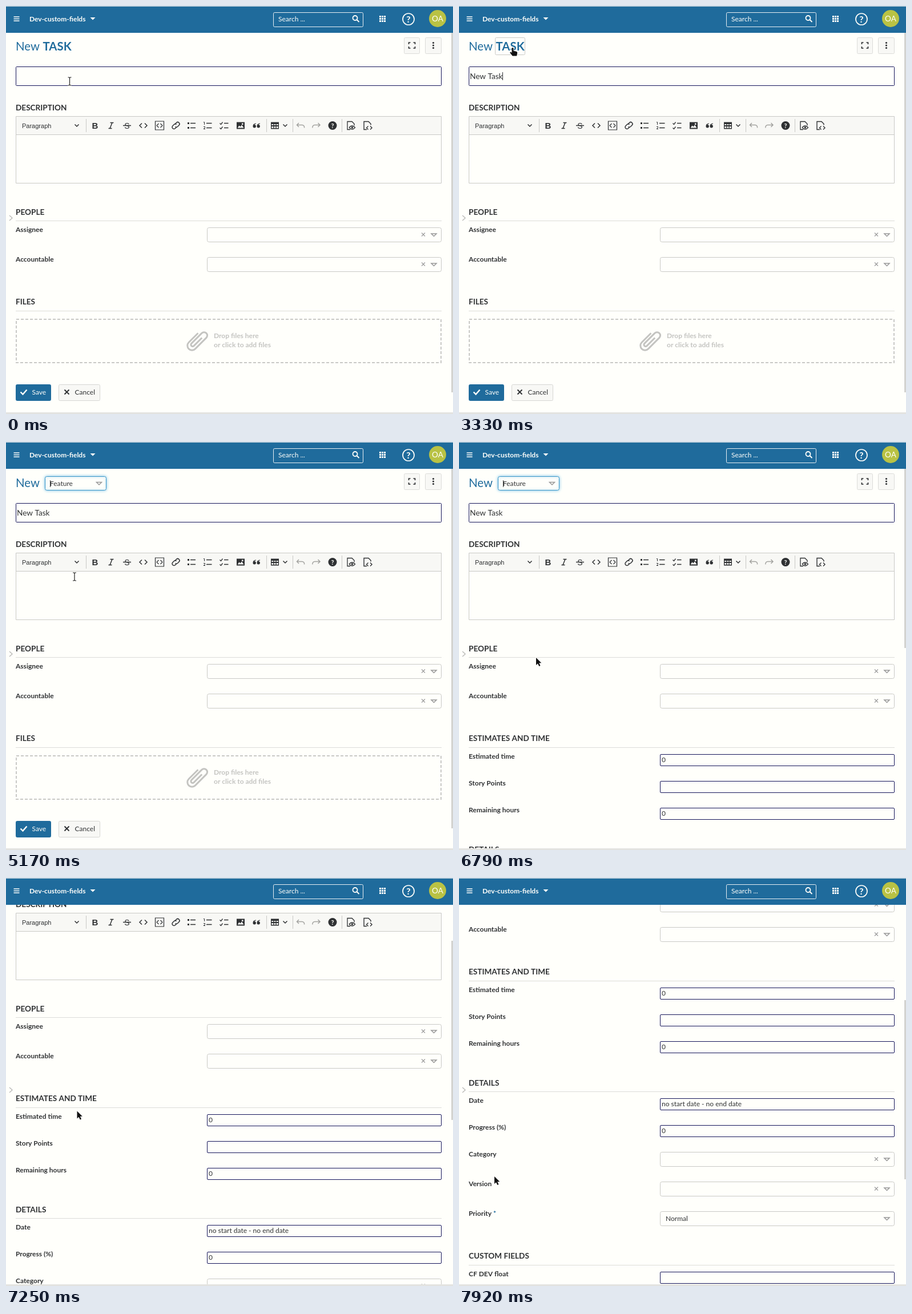
An HTML page with a canvas that plays this animation: 783x715 px, repeating every 8 s.

```html
<!DOCTYPE html>
<html lang="en">
<head>
<meta charset="utf-8">
<title>New task form</title>
<style>
html, body { margin: 0; width: 100%; height: 100%; overflow: hidden; background: #fffffb; }
canvas { display: block; }
</style>
</head>
<body>
<canvas id="stage" width="783" height="715"></canvas>
<script>
const ctx = document.getElementById('stage').getContext('2d');
const LOOP = 8000, FPS = 24;
const PAPER = '#fffffb', BLUE = '#1f6b9c', INK = '#2f3133', NAVY = '#15155a',
      GREY = '#c9c9c6', MUTED = '#999', PANEL = '#f8f8f5';

// Keyframes: [tick, ...values], linear in between
const MOUSE = [[0, 111.5, 132], [2, 111.5, 132], [3, 112.5, 131], [64, 112.5, 131], [75, 94, 73],
  [101, 94, 73], [116, 119, 236], [123, 119, 236], [124, 120, 236], [145, 120, 236], [146, 120, 237],
  [149, 120, 237], [153, 119, 264], [156, 119, 264], [163, 135, 378], [174, 124.5, 408.5],
  [176, 124, 410], [185, 61, 523], [190, 62, 523]];
const SCROLL = [[163, 0], [174, 133], [176, 152], [185, 270], [190, 355]];

function track(keys, tick) {
  if (tick <= keys[0][0]) return keys[0].slice(1);
  const i = keys.findIndex(k => k[0] > tick);
  if (i < 0) return keys.at(-1).slice(1);
  const a = keys[i - 1], b = keys[i], p = (tick - a[0]) / (b[0] - a[0]);
  return a.slice(1).map((v, n) => v + (b[n + 1] - v) * p);
}

function text(s, x, y, { color = INK, size = 12, weight = 400, family = 'Lato', align = 'left' } = {}) {
  ctx.font = `${weight} ${size}px ${family}, sans-serif`;
  ctx.fillStyle = color;
  ctx.textAlign = align;
  ctx.fillText(s, x, y);
}
const bold = (s, x, y, o) => text(s, x, y, { weight: 700, ...o });

function fill(x, y, w, h, color) {
  ctx.fillStyle = color;
  ctx.fillRect(x, y, w, h);
}

// Box whose one-pixel border lies inside x, y, w, h
function box(x, y, w, h, border, back, r = 0) {
  ctx.beginPath();
  ctx.roundRect(x + .5, y + .5, w - 1, h - 1, r);
  if (back) { ctx.fillStyle = back; ctx.fill(); }
  ctx.lineWidth = 1;
  ctx.strokeStyle = border;
  ctx.stroke();
}

function icon(d, x, y, { color = INK, stroke = 1.5, solid, angle = 0 } = {}) {
  ctx.save();
  ctx.translate(x, y);
  ctx.rotate(angle);
  const path = new Path2D(d);
  ctx.fillStyle = ctx.strokeStyle = color;
  ctx.lineWidth = stroke;
  if (solid) ctx.fill(path, 'evenodd'); else ctx.stroke(path);
  ctx.restore();
}

function disc(x, y, r, color) {
  ctx.beginPath();
  ctx.arc(x, y, r, 0, 7);
  ctx.fillStyle = color;
  ctx.fill();
}

const DOWN = 'M-4.5 -2h9l-4.5 4.5z', UP = 'M-4.5 2h9l-4.5 -4.5z';
const CHEVRON = 'M-3.5 -2l3.5 3.5l3.5 -3.5', CROSS = 'M-3 -3l6 6M3 -3l-6 6';
const EDITOR_ICONS = [
  [124, CHEVRON], [489, CHEVRON],
  [184, 'M-1.5 -5h6M-4.5 5h6M2 -5l-4 10'],
  [212, 'M-7 0h14'],
  [240.5, 'M-2.5 -4l-4 4l4 4M2.5 -4l4 4l-4 4'],
  [269, 'M-7.5 -7.5h15v15h-15zM-1.5 -3.5l-3.5 3.5l3.5 3.5M1.5 -3.5l3.5 3.5l-3.5 3.5', { stroke: 1.2 }],
  [297.5, 'M-1 -3l2 -2a3 3 0 0 1 4.5 4.5l-2.5 2.5a3 3 0 0 1 -4 0M1 3l-2 2a3 3 0 0 1 -4.5 -4.5l2.5 -2.5a3 3 0 0 1 4 0'],
  [325, 'M-7 -4h3M-7 4h3', { stroke: 3 }], [325, 'M-2 -4h9M-2 4h9'],
  [353, 'M-7 -6h1.5v4.5M-7 2h2.5v2l-2.5 2h3', { stroke: 1 }], [353, 'M-2 -4h9.5M-2 4h9.5'],
  [382, 'M-7.5 -4l2 2l3 -4M-7.5 4l2 2l3 -4M0 -4h7.5M0 4h7.5', { stroke: 1.3 }],
  [411, 'M-7 -6h14v12h-14zM-5.5 4h11l-3.5 -5l-2.5 3l-2 -2zM2 -4h2.5v2.5h-2.5z', { solid: true }],
  [439, 'M-1 -4q-5.5 .5 -5.5 5a2.7 2.7 0 1 0 2.5 -2.5q.5 -1.5 3 -1.5zM6 -4q-5.500 .5 -5.500 5a2.700 2.700 0 1 0 2.500 -2.500q.5 -1.500 3 -1.500z', { solid: true }],
  [471, 'M-7 -6h14v12h-14zM-5.7 -2.5v2h3v-2zM-1.300 -2.500v2h2.600v-2zM2.700 -2.500v2h3v-2zM-5.700 1.500v3h3v-3zM-1.300 1.500v3h2.600v-3zM2.700 1.500v3h3v-3z', { solid: true }],
  [516, 'M-3 -4.500l-3.500 3.500l3.500 3.500M-6.500 -1h9a4 4 0 0 1 4 5', { color: '#a3a3a0' }],
  [543.5, 'M3 -4.500l3.500 3.500l-3.500 3.500M6.500 -1h-9a4 4 0 0 0 -4 5', { color: '#a3a3a0' }],
  [604, 'M-1 7h-5v-14h8l4 4v3M-3 3.500q5 -6 10.500 0q-5 6 -10.500 0', { stroke: 1.3 }],
  [604, 'M.5 3.500a1.800 1.800 0 1 0 3.600 0a1.800 1.800 0 1 0 -3.600 0', { solid: true }],
  [633, 'M-1 7h-5v-14h8l4 4v2M1.500 1l-3 3l3 3M5 1l3 3l-3 3', { stroke: 1.4 }]
];

function editor() {
  box(17, 193, 746, 118, GREY);
  fill(18, 194, 744, 31, PANEL);
  fill(17, 225, 746, 1, GREY);
  text('Paragraph', 28, 213.5, { size: 11, family: '"Liberation Sans"' });
  bold('B', 156, 214.5, { size: 15, family: '"Liberation Sans"', align: 'center' });
  text('S', 212, 214.5, { size: 14, family: '"Liberation Sans"', align: 'center' });
  for (const x of [140, 456, 502, 588]) fill(x, 198, 1, 23, GREY);
  for (const [x, d, o] of EDITOR_ICONS) icon(d, x, 209.5, o);
  disc(572, 209.5, 7.5, INK);
  bold('?', 572, 213.5, { color: PAPER, size: 11, align: 'center' });
}

const select = (label, value) => ({ label, value, pick: true });
const input = (label, value) => ({ label, value });
const PEOPLE = ['PEOPLE', [select('Assignee'), select('Accountable')]];
const FEATURE_FORM = [PEOPLE,
  ['ESTIMATES AND TIME', [input('Estimated time', '0'), input('Story Points'), input('Remaining hours', '0')]],
  ['DETAILS', [input('Date', 'no start date - no end date'), input('Progress (%)', '0'),
    select('Category'), select('Version'), select('Priority *', 'Normal')]],
  ['CUSTOM FIELDS', [input('CF DEV float')]]];
const TASK_FORM = [PEOPLE, ['FILES', []]];

function row({ label, value, pick }, y) {
  const top = Math.floor(y - 3.5), base = Math.round(y + 4);
  const name = label.replace(' *', '');
  bold(name, 17, base);
  if (name !== label) bold('*', 20 + ctx.measureText(name).width, base, { color: BLUE });
  if (pick) {
    box(352, top, 411, 26, GREY, null, 3);
    icon(DOWN, 749.5, top + 13, { color: MUTED });
    if (value) text(value, 362, top + 17);
    else icon(CROSS, 731, top + 12.5, { color: MUTED, stroke: 1.1 });
  } else {
    box(352, top, 411, 21, NAVY, null, 1.5);
    if (value) text(value, 355, top + 14);
  }
}

function form(sections) {
  let y = 361;
  for (const [title, rows] of sections) {
    bold(title, 17, Math.round(y + 4.6), { size: 13.6 });
    fill(17, Math.floor(y + 15.5), 746, 1, '#dcdcd9');
    y += 31;
    for (const r of rows) {
      row(r, y);
      y += r.pick ? 52 : 47;
    }
    y += 22.5;
  }
}

function filesAndButtons() {
  ctx.setLineDash([5, 3]);
  ctx.lineWidth = 2;
  ctx.strokeStyle = GREY;
  ctx.strokeRect(18, 549, 744, 76);
  ctx.setLineDash([]);
  icon('M-8 -10V13a8 8 0 0 0 16 0V-14.500a5.700 5.700 0 0 0 -11.400 0V11a3 3 0 0 0 6 0V-9', 335, 586,
    { color: '#c4c4c1', stroke: 3, angle: Math.PI / 4 });
  bold('Drop files here', 364, 582, { color: '#c4c4c1' });
  bold('or click to add files', 364, 598, { color: '#c4c4c1' });
  box(17, 663, 62, 29, BLUE, BLUE, 2);
  icon('M-5.500 0l4 4l7 -8', 31, 676.5, { color: PAPER, stroke: 2.4 });
  text('Save', 45.5, 681, { color: PAPER });
  box(92, 663, 73, 29, '#d6d6d3', PANEL, 2);
  icon('M-4 -4l8 8M4 -4l-8 8', 106.5, 676.5, { stroke: 1.9 });
  text('Cancel', 120.5, 681);
}

function titleButtons() {
  box(697, 55, 28, 29, '#dcdcd9', PANEL, 2);
  box(734, 55, 29, 29, '#dcdcd9', PANEL, 2);
  icon('M-5.500 -2v-3h3M2.500 -5h3v3M5.500 2v3h-3M-2.500 5h-3v-3', 711, 69, { stroke: 1.7 });
  for (const y of [64.5, 69, 73.5]) disc(748.5, y, 1.6, INK);
}

function typeSelect(open, value, caret) {
  if (!open) {
    ctx.save();
    ctx.shadowColor = '#7cc0e6';
    ctx.shadowBlur = 5;
    box(68, 60, 108, 25, '#3a97c9', PAPER, 3);
    ctx.restore();
  } else box(68, 60, 108, 26, GREY, PAPER, 3);
  text(value, 77, 76.5, { color: open ? '#77776f' : INK });
  icon(open ? UP : DOWN, 163, 72.5, { color: MUTED });
  if (caret) fill(77, 67, 1, 12, INK);
}

function menu(mouseY) {
  ctx.save();
  ctx.shadowColor = '#0003';
  ctx.shadowBlur = 3;
  ctx.shadowOffsetY = 1;
  box(68, 85, 108, 202, GREY, PAPER, 1);
  ctx.restore();
  ['Task', 'Required CF', 'Milestone', 'Phase', 'Feature', 'Epic'].forEach((name, i) => {
    const top = Math.round(86 + i * 31.8), hover = mouseY >= top && mouseY < top + 32;
    if (!i || hover) fill(69, top, 95, 31, i ? '#f3f8fd' : '#e9f2fb');
    text(name, 77, top + 19, { weight: i ? 400 : 700 });
  });
  fill(164, 86, 11, 200, '#f0f0ee');
  fill(165, 98, 9, 123, '#c1c1be');
  icon('M-3 1.500h6l-3 -3z', 169.5, 92, { color: '#a0a09d', solid: true });
  icon('M-3 -1.500h6l-3 3z', 169.5, 280, { color: '#50504e', solid: true });
}

function header() {
  fill(0, 0, 783, 47, BLUE);
  fill(0, 0, 783, 1, '#c7d5df');
  icon('M-5 -3.500h10M-5 0h10M-5 3.500h10', 18.5, 22.5, { color: PAPER, stroke: 1.6 });
  bold('Dev-custom-fields', 41, 27, { color: PAPER });
  icon(DOWN, 152, 22, { color: PAPER, solid: true });
  box(468, 11, 158, 26, '#e8eff3', null, 2);
  text('Search ...', 477, 27, { color: PAPER });
  icon('M3 -1.500a4 4 0 1 1 -8 0a4 4 0 1 1 8 0M2 1.500l4 4', 612.5, 22.5, { color: PAPER, stroke: 1.8 });
  for (let i = 0; i < 9; i++) fill(654 + i % 3 * 4, 17 + (i / 3 | 0) * 4, 3, 3, PAPER);
  icon('M10 0a10 10 0 1 1 -20 0a10 10 0 1 1 20 0', 705, 23, { color: PAPER, stroke: 1.7 });
  bold('?', 705, 28.5, { color: PAPER, size: 16, align: 'center' });
  disc(756, 22, 15, '#b9c244');
  text('OA', 756, 26.5, { color: PAPER, size: 13.6, align: 'center' });
}

function pointer(kind, x, y) {
  if (kind === 'beam') {
    const d = 'M-3 -7h2l1 1l1 -1h2M-3 7h2l1 -1l1 1h2M0 -6v12';
    icon(d, x, y, { color: PAPER, stroke: 2.6 });
    icon(d, x, y, { color: '#222', stroke: 1.2 });
    return;
  }
  const d = kind === 'hand'
    ? 'M-1.500 1q1.500 -2 3 0v4.500l5 1.200q2 .5 1.700 2.500l-1 5.300h-7.500l-4 -5q-1 -2 1 -2l1.800 1.500z'
    : 'M0 0v13l3 -2.800l2.300 4.800l2.200 -1l-2.200 -4.700h4z';
  icon(d, x, y, { color: PAPER, stroke: 1.8 });
  icon(d, x, y, { color: '#111', solid: true });
}

function draw(ms) {
  const f = Math.floor(ms * FPS / 1000 + .1);
  const [mx, my] = track(MOUSE, f);
  const scroll = Math.round(track(SCROLL, f)[0]);
  const picking = f >= 91, open = f >= 92 && f < 121, feature = f >= 139;

  fill(0, 0, 783, 715, PAPER);
  ctx.save();
  ctx.beginPath();
  ctx.rect(0, 47, 783, 666);
  ctx.clip();
  ctx.translate(0, -scroll);
  titleButtons();

  ctx.save();
  if (picking) ctx.translate(0, 1);
  text('New', 17, 77.5, { color: BLUE, size: 20.4 });
  if (!picking) {
    if (f >= 72) box(63, 55, 53, 31, GREY, null, 2);
    bold('TASK', 64.5, 77.5, { color: BLUE, size: 20.4 });
  }
  const typed = f < 33 ? 0 : Math.min(8, 1 + Math.floor((f - 33) * 7 / 18));
  const name = 'New Task'.slice(0, typed);
  box(17, 106, 746, 34, NAVY, null, 1);
  text(name, 19, 127.5, { size: 13.6 });
  if (f >= 9 && f < 22 || f >= 33 && f < 65 || f >= 80 && f < 91)
    fill(Math.round(19 + ctx.measureText(name).width), 116, 1, 14, INK);
  bold('DESCRIPTION', 17, 183, { size: 13.6 });
  editor();
  form(feature ? FEATURE_FORM : TASK_FORM);
  if (!feature) filesAndButtons();
  ctx.restore();

  if (picking) {
    const caret = f < 104 || f >= 121 && f < 135 || f >= 150 && f < 164;
    typeSelect(open, f < 121 ? 'Task' : 'Feature', caret);
  }
  if (open) menu(my);
  ctx.restore();

  if (!(open && my > 86))
    fill(780, 47 + Math.round(scroll * .47), 3, feature ? 314 : 630, '#d3d3d0');
  icon('M-2.500 -4.500l5 4.500l-5 4.500', 8.5, 371.5, { color: '#b5b5b2', stroke: 1.2 });
  fill(0, 712, 783, 3, PAPER);
  fill(0, 712.5, 783, 2, '#d8d8d5');
  header();

  let kind = 'arrow';
  if (f >= 124) kind = my < 311 ? 'beam' : 'arrow';
  else if (picking || my < 86) kind = 'hand';
  else if (my > 106) kind = 'beam';
  pointer(kind, mx, my);
}

const start = performance.now();
function loop() {
  draw((performance.now() - start) % LOOP);
  requestAnimationFrame(loop);
}
loop();
</script>
</body>
</html>
```
